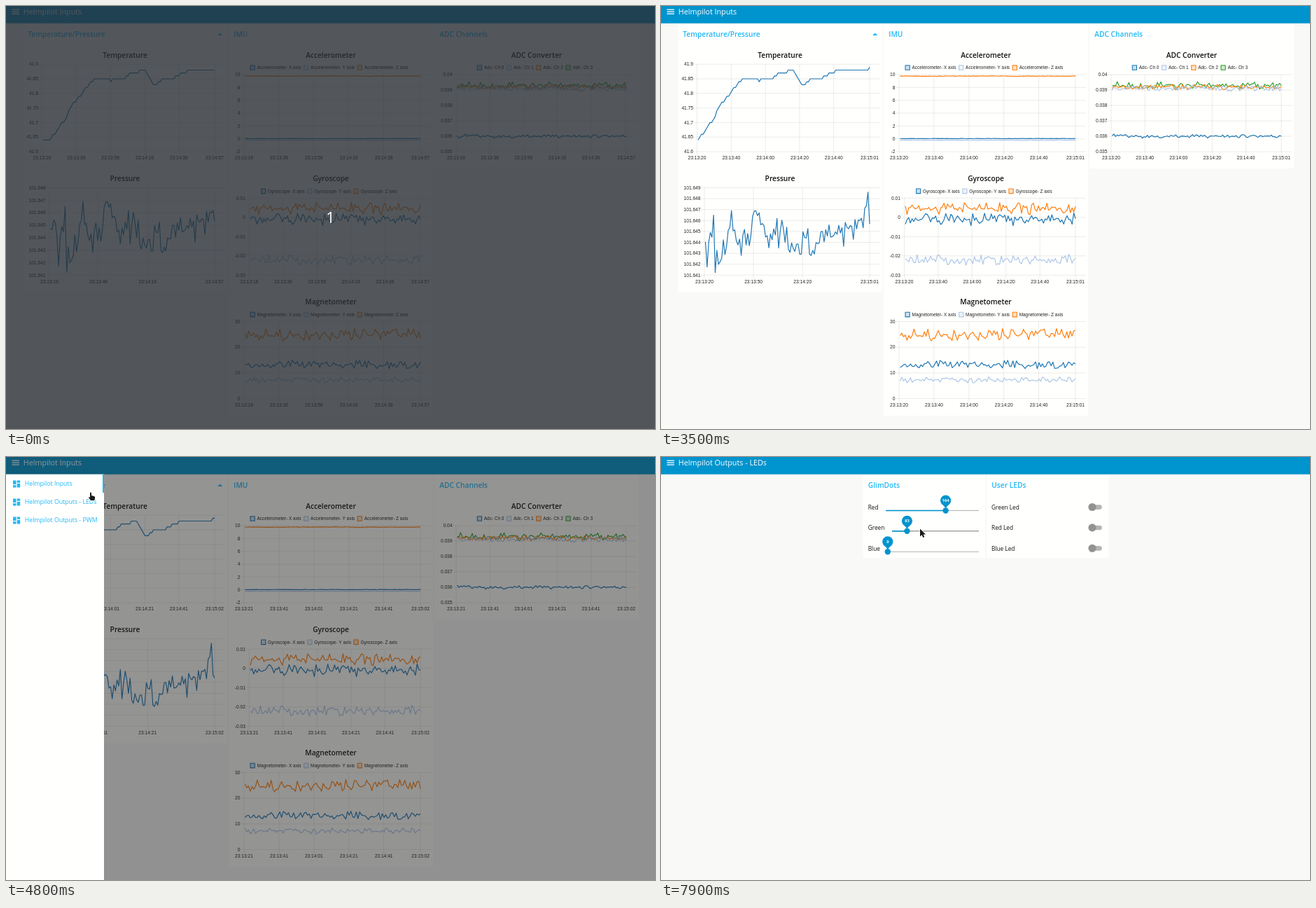
An HTML page with a canvas for the animation above (8 s loop, 927 px wide and 604 px high).

```html
<!DOCTYPE html>
<html lang="en">
<head>
<meta charset="utf-8">
<title>Dashboard</title>
<style>
  html, body { margin: 0; width: 100%; height: 100%; overflow: hidden; background: #f9f9f8; }
  canvas { display: block; }
</style>
</head>
<body>
<canvas id="stage" width="927" height="604"></canvas>
<script>
const ctx = document.getElementById('stage').getContext('2d');
const LOOP = 8000, SPAN = 101, COLUMN = 294;
const OPEN_AT = 4367, CLOSE_AT = 5800, RED_AT = 7150, GREEN_AT = 7832;
const UI = '"Open Sans", sans-serif', PLOT = '"Liberation Sans", sans-serif';
const TICK = `6.65px ${PLOT}`, LEGEND = `6.45px ${PLOT}`, LABEL = `8.3px ${UI}`;
const PRIMARY = '#0094ce', ACCENT = '#21b8f5', GRID = 'rgba(0,0,0,.1)';
const COLORS = ['#1f77b4', '#aec7e8', '#ff7f0e', '#2ca02c'];

// ---- timing ----
// CSS-style cubic bezier whose x handles are both .25
function bezier(p, y1, y2) {
  if (p <= 0) return 0;
  if (p >= 1) return 1;
  const at = (s, a, b) => 3 * s * (1 - s) ** 2 * a + 3 * s * s * (1 - s) * b + s ** 3;
  let lo = 0, hi = 1;
  for (let i = 0; i < 20; i++) {
    const mid = (lo + hi) / 2;
    if (at(mid, .25, .25) < p) lo = mid; else hi = mid;
  }
  return at(lo, y1, y2);
}
const swift = p => bezier(p, .8, 1);
const ease = p => bezier(p, .1, 1);
const clamp = (v, lo, hi) => Math.min(hi, Math.max(lo, v));

function along(points, t) {
  let i = 1;
  while (i < points.length - 1 && points[i][0] < t) i++;
  const a = points[i - 1], b = points[i];
  const p = clamp((t - a[0]) / (b[0] - a[0]), 0, 1);
  return a.slice(1).map((v, j) => v + (b[j + 1] - v) * p);
}

// ---- data, one sample per second ----
const rand = (seed, k) => {
  const v = Math.sin(seed * 91.7 + k * 12.9898) * 43758.5453;
  return v - Math.floor(v);
};
const noise = (seed, mean, amp) => k =>
  mean + amp * (rand(seed, k) + rand(seed + 50, k) - 1);

const TEMP_TREND = [[0, 4], [4, 4], [13, 11.3], [17, 16], [30, 25], [38, 25], [40, 24], [42, 25], [48, 25],
  [51, 27], [55, 27], [58, 28], [60, 28], [65, 23], [67, 23], [71, 25], [76, 25], [86, 28], [104, 28], [105, 29]];
const temperature = k => 41.6 + Math.round(along(TEMP_TREND, k)[0]) / 100;

const PRESSURE_TREND = [[0, 4.8], [2, 6], [5, 2.8], [9, 5.6], [10, 1.6], [14, 2.6], [19, 6.4], [23, 4],
  [29, 4], [36, 6.8], [42, 4], [51, 5.2], [63, 3.2], [67, 5], [68, 2], [74, 4.6], [90, 5],
  [101, 6], [104, 8.5], [105, 5.6], [107, 5.5]];
const pressureNoise = noise(20, 0, 1.6);
const pressure = k =>
  101.64 + clamp(along(PRESSURE_TREND, k)[0] + pressureNoise(k), 1.1, 8.6) / 1000;

const axes = name => ['X', 'Y', 'Z'].map(a => `${name}- ${a} axis`);
const CHARTS = [
  { title: 'Temperature', col: 0, row: 0, left: 118.5, min: 41.6, max: 41.9, step: .05, series: [temperature] },
  { title: 'Pressure', col: 0, row: 1, left: 108, min: 101.641, max: 101.649, step: .001, every: 30,
    series: [pressure] },
  { title: 'Accelerometer', col: 1, row: 0, left: 124, min: -2, max: 10, step: 2, legend: axes('Accelerometer'),
    series: [noise(1, .04, .04), noise(2, -.22, .04), noise(3, 9.77, .06)] },
  { title: 'Gyroscope', col: 1, row: 1, left: 116.5, min: -.03, max: .01, step: .01, legend: axes('Gyroscope'),
    series: [noise(4, -.001, .0036), noise(5, -.022, .0034), noise(6, .0045, .0036)] },
  { title: 'Magnetometer', col: 1, row: 2, left: 124, min: 0, max: 30, step: 10, legend: axes('Magnetometer'),
    series: [noise(7, 13.2, 2), noise(8, 7.3, 1.5), noise(9, 25, 2.8)] },
  { title: 'ADC Converter', col: 2, row: 0, left: 115, min: .035, max: .04, step: .001,
    legend: [0, 1, 2, 3].map(n => 'Adc- Ch ' + n),
    series: [noise(10, .036, .00015), noise(11, .03912, .00024), noise(12, .0392, .0002), noise(13, .03928, .0003)] },
];

// ---- drawing helpers ----
function text(str, x, y, font, color, align = 'left') {
  ctx.font = font;
  ctx.fillStyle = color;
  ctx.textAlign = align;
  ctx.fillText(str, x, y);
}
function rect(x, y, w, h, color) {
  ctx.fillStyle = color;
  ctx.fillRect(x, y, w, h);
}
function disc(x, y, r, color) {
  ctx.fillStyle = color;
  ctx.beginPath();
  ctx.arc(x, y, r, 0, 7);
  ctx.fill();
}
function triangle(x, y, halfWidth, height, color) {
  ctx.fillStyle = color;
  ctx.beginPath();
  ctx.moveTo(x - halfWidth, y);
  ctx.lineTo(x + halfWidth, y);
  ctx.lineTo(x, y + height);
  ctx.fill();
}
function line(points, color, width) {
  ctx.strokeStyle = color;
  ctx.lineWidth = width;
  ctx.lineJoin = 'round';
  ctx.beginPath();
  points.forEach(([x, y]) => ctx.lineTo(x, y));
  ctx.stroke();
}
function card(title, x, w, bottom) {
  rect(x, 26, w, bottom - 26, '#fffffd');
  text(title, x + 7.3, 43.6, `600 10.2px ${UI}`, ACCENT);
}
function clock(seconds) {
  const s = 13 * 60 + 16 + seconds, pad = v => String(v).padStart(2, '0');
  return `23:${pad(Math.floor(s / 60))}:${pad(s % 60)}`;
}

// ---- charts ----
function legend(labels, cx, y) {
  ctx.font = LEGEND;
  const widths = labels.map(s => ctx.measureText(s).width + 13.6);
  let x = cx - (widths.reduce((a, b) => a + b) - 4) / 2;
  labels.forEach((label, i) => {
    ctx.globalAlpha = .22;
    rect(x, y, 6.2, 6.6, COLORS[i]);
    ctx.globalAlpha = 1;
    ctx.strokeStyle = COLORS[i];
    ctx.lineWidth = 1.1;
    ctx.strokeRect(x, y, 6.2, 6.6);
    text(label, x + 9.5, y + 5.6, LEGEND, '#222');
    x += widths[i];
  });
}

function chart({ title, col, row, left, min, max, step, every = 20, legend: labels, series }, shift) {
  const cx = 170 + COLUMN * col, cy = 70 + 176.3 * row;
  const x0 = cx - left, x1 = cx + 128;
  const top = cy + (labels ? 28 : 13.2), bottom = cy + 138;
  // the pressure scale grows once its samples pass the top
  if (series[0] === pressure && shift < 2) max -= step;
  const toX = s => x0 + s / SPAN * (x1 - x0);
  const toY = v => bottom - (v - min) / (max - min) * (bottom - top);

  text(title, cx, cy + 3.6, `600 10.2px ${UI}`, '#111', 'center');
  if (labels) legend(labels, cx - 2.3, cy + 14.7);

  for (let v = min; v < max + step / 2; v += step) {
    line([[x0 - 5, toY(v)], [x1 + 15, toY(v)]], GRID, .8);
    text(String(+v.toFixed(3) + 0), x0 - 5.5, toY(v) + 2.2, TICK, '#222', 'right');
  }
  const ticks = [SPAN];
  for (let s = 0; s <= SPAN - 20; s += every) ticks.push(s);
  for (const s of ticks) {
    line([[toX(s), top], [toX(s), bottom + 5]], GRID, .8);
    text(clock(s + shift), toX(s), bottom + 11.2, TICK, '#222', 'center');
  }
  for (let i = series.length - 1; i >= 0; i--) {
    const points = Array.from({ length: SPAN + 1 }, (_, s) =>
      [toX(s) + 1.5 * (1 - s / SPAN), toY(series[i](s + shift))]);
    line(points, COLORS[i], 1.2);
  }
}

// ---- pages ----
function header(title) {
  rect(0, 25, 927, 1, 'rgba(0,0,0,.04)');
  rect(0, 0, 927, 24.7, PRIMARY);
  for (let y = 4.5; y < 11; y += 3) rect(8.5, y, 10.5, 1.3, '#fff');
  text(title, 24.7, 11.6, `10.75px ${UI}`, '#fff');
}

function inputsPage(shift) {
  card('Temperature/Pressure', 24, 292, 408.5);
  card('IMU', 24 + COLUMN, 292, 585);
  card('ADC Channels', 24 + 2 * COLUMN, 292, 232);
  triangle(305.8, 42, 3.6, -3.4, ACCENT);
  CHARTS.forEach(c => chart(c, shift));
}

function slider(label, y, x0, value, progress, track) {
  const x = x0 + value / 255 * (454 - x0) * progress;
  text(label, 295.7, y - 1.8, LABEL, '#111');
  rect(x0, y - .5, 454 - x0, 1, track);
  rect(x0, y - .8, x - x0, 1.6, PRIMARY);
  disc(x, y, 4.2, PRIMARY);
  disc(x, y - 14.5, 7.6, PRIMARY);
  triangle(x, y - 11.2, 6.8, 7.7, PRIMARY);
  text(value, x, y - 12.4, `700 5.8px ${UI}`, '#fff', 'center');
}

function toggle(label, y) {
  text(label, 472, y + 3.2, LABEL, '#111');
  ctx.fillStyle = '#b5b5b4';
  ctx.beginPath();
  ctx.roundRect(611, y - 3.2, 18.8, 6.6, 3.3);
  ctx.fill();
  disc(616, y, 5.6, '#929292');
}

function outputsPage(t) {
  card('GlimDots', 288.5, 174.5, 144);
  card('User LEDs', 465, 174.5, 144);
  slider('Red', 76.5, 321.2, t < RED_AT ? 0 : 164, swift((t - RED_AT) / 400), '#b2b2b2');
  slider('Green', 105.8, 330, t < GREEN_AT ? 0 : 83, swift((t - GREEN_AT) / 400), '#777');
  slider('Blue', 135.3, 323.8, 0, 0, '#b2b2b2');
  ['Green Led', 'Red Led', 'Blue Led'].forEach((label, i) => toggle(label, 71.5 + i * 29.4));
}

function drawer(open, selected, lit) {
  ctx.save();
  ctx.translate(140 * (open - 1), 0);
  rect(0, 24.7, 140, 580, '#fffffe');
  if (lit) rect(0, 51, 140, 26, '#c6e7f4');
  rect(138, 25 + selected * 26, 2, 26, ACCENT);
  ['Inputs', 'Outputs - LEDs', 'Outputs - PWM'].forEach((name, i) => {
    const y = 33.5 + i * 26;
    rect(10, y, 4.5, 5.5, ACCENT);
    rect(10, y + 6.7, 4.5, 3.3, ACCENT);
    rect(15.7, y, 4.5, 3.3, ACCENT);
    rect(15.7, y + 4.5, 4.5, 5.5, ACCENT);
    text('Helmpilot ' + name, 26.8, y + 7.8, `8.74px ${UI}`, ACCENT);
  });
  ctx.restore();
}

// ---- pointer ----
const ARROW = new Path2D('M0 0V11L2.6 8.7L4.4 12.6L6.3 11.8L4.6 8H8Z');
const HAND = new Path2D('M-1 0Q0-1 1 0V4L5 5Q6 5.3 6 7V9L5 11H0L-3 7Q-3 5.6-1 6.5Z');
const POINTER_PATH = [[3600, 210, 150], [4200, 12.5, 11], [4700, 12.5, 11], [4800, 121, 51],
  [5200, 80, 67], [6300, 80, 67], [6700, 428.5, 94], [7100, 406, 77], [7300, 406, 77], [7700, 370, 102.5]];

function pointer(t) {
  if (t < 3600) return;
  const shape = t >= 4200 && t <= 6400 ? HAND : ARROW;
  ctx.save();
  ctx.translate(...along(POINTER_PATH, t));
  ctx.strokeStyle = '#fff';
  ctx.lineWidth = 1.4;
  ctx.stroke(shape);
  ctx.fillStyle = '#1a1a1a';
  ctx.fill(shape);
  ctx.restore();
}

function draw(t) {
  const outputs = t >= CLOSE_AT;
  rect(0, 0, 927, 604, '#f9f9f8');
  header('Helmpilot ' + (outputs ? 'Outputs - LEDs' : 'Inputs'));
  if (outputs) outputsPage(t);
  else inputsPage(Math.floor((t + 500) / 1000));

  const dim = ease((t - OPEN_AT) / 450) - ease((t - CLOSE_AT) / 450);
  const open = swift((t - OPEN_AT) / 400) - swift((t - CLOSE_AT) / 400);
  if (dim > 0) rect(0, 0, 927, 604, `rgba(33,33,33,${.48 * dim})`);
  if (open > 0) drawer(open, outputs ? 1 : 0, t >= 5600);
  pointer(t);

  if (t < 100) {
    rect(0, 0, 927, 604, 'rgba(41,46,52,.8)');
    text('1', 463.3, 310, `21.5px ${UI}`, '#fff', 'center');
  }
}

// The screen is sampled ten times a second and stalls twice.
function frame(now) {
  let t = Math.floor(now % LOOP / 100) * 100;
  if (t === 4700 || t === 5500) t -= 100;
  draw(t);
  requestAnimationFrame(frame);
}
requestAnimationFrame(frame);
</script>
</body>
</html>
```
